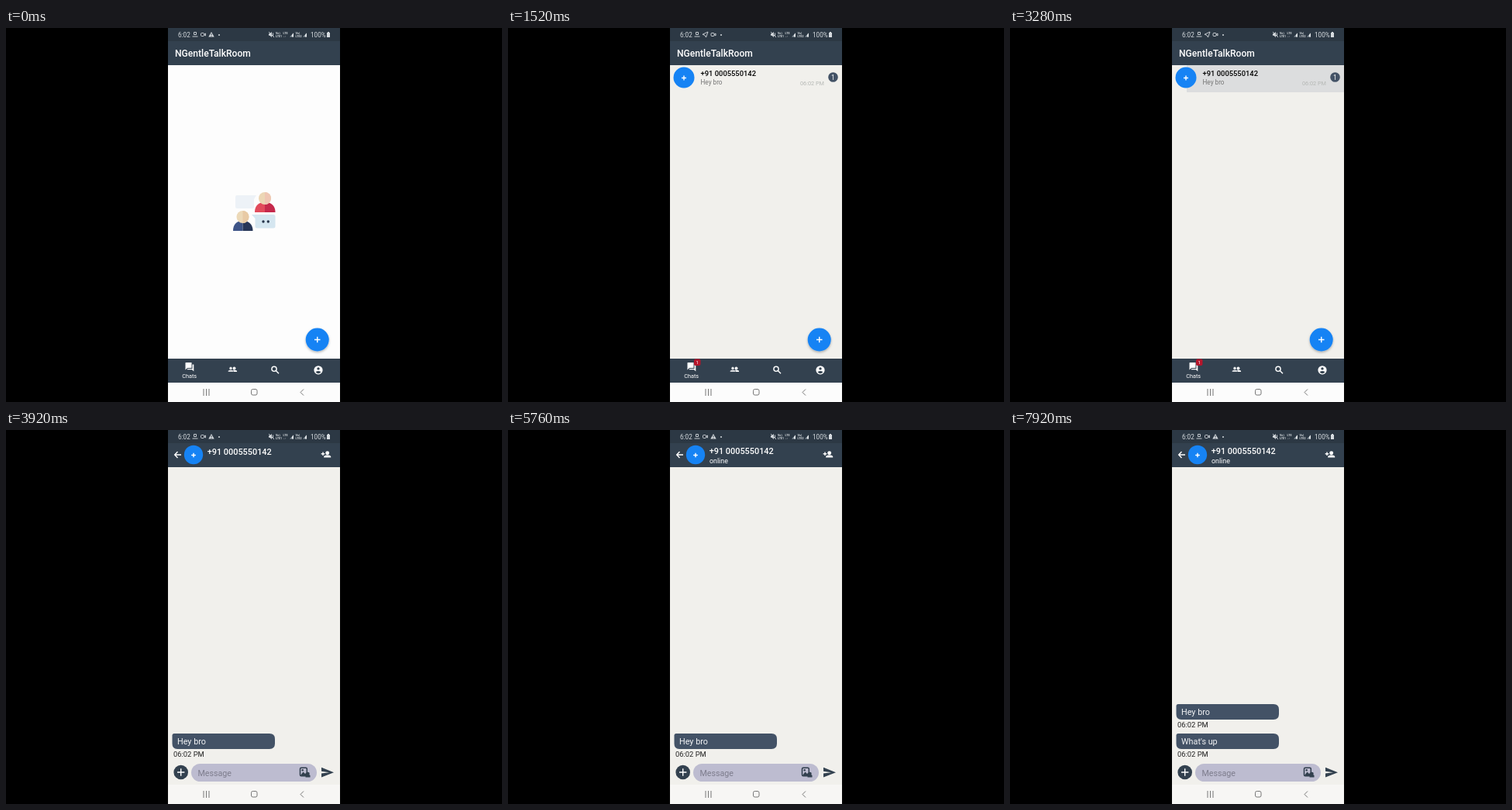
An HTML page for the animation above (8 s loop, 640 by 483 pixels).

```html
<!DOCTYPE html>
<html lang="en">
<head>
<meta charset="utf-8">
<title>Chat app</title>
<style>
  html, body { margin: 0; width: 100%; height: 100%; overflow: hidden; background: #000; }
  svg { display: block; width: 640px; height: 483px; font-family: Roboto, sans-serif; }
  .bar { fill: #33414f; }
  .white { fill: #fff; }
  .blue { fill: #1683f4; }
  .bubble { fill: #435266; }
  .line { fill: none; stroke: #fff; stroke-width: 1.4; }
  .thin { fill: none; stroke: #d5dade; stroke-width: .9; }
  .sys { fill: none; stroke: #777; stroke-width: 1; }
  .medium { font-weight: 500; }

  /* Scenes switch hard on one shared 8 s clock */
  .empty, .inbox, .filled, .chat, .plain, .online, .typing, .one, .two, .alert, .warn {
    animation: 8s step-end infinite;
  }
  .empty  { animation-name: empty; }
  .inbox  { animation-name: inbox; }
  .filled, .alert { animation-name: filled; }
  .warn   { animation-name: warn; }
  .chat   { animation-name: chat; }
  .plain  { animation-name: plain; }
  .online { animation-name: online; }
  .typing { animation-name: typing; }
  .one    { animation-name: one; }
  .two    { animation-name: two; }
  @keyframes empty  { 0% { visibility: visible } 10%, 100% { visibility: hidden } }
  @keyframes inbox  { 0% { visibility: visible } 45%, 100% { visibility: hidden } }
  @keyframes filled { 0% { visibility: hidden } 10% { visibility: visible } 45%, 100% { visibility: hidden } }
  @keyframes warn   { 0% { visibility: visible } 10% { visibility: hidden } 45%, 100% { visibility: visible } }
  @keyframes chat   { 0% { visibility: hidden } 45%, 100% { visibility: visible } }
  @keyframes plain  { 0% { visibility: hidden } 45% { visibility: visible } 56%, 100% { visibility: hidden } }
  @keyframes online { 0% { visibility: hidden } 56% { visibility: visible } 80% { visibility: hidden } 93%, 100% { visibility: visible } }
  @keyframes typing { 0% { visibility: hidden } 80% { visibility: visible } 93%, 100% { visibility: hidden } }
  @keyframes one    { 0%, 100% { transform: none } 93% { transform: translateY(-38px) } }
  @keyframes two    { 0% { visibility: hidden } 93%, 100% { visibility: visible } }

  .press { animation: press 8s linear infinite; }
  @keyframes press { 0%, 39% { opacity: 0 } 41%, 45% { opacity: 1 } 45.01%, 100% { opacity: 0 } }
  .say { animation: say 8s linear infinite; }
  @keyframes say { 0% { fill: #edf2f7 } 6%, 100% { fill: #dce9f2 } }
  .dot { fill: #26344a; animation: dot .8s linear infinite; }
  .dot.first { animation-name: first; }
  @keyframes dot { 0%, 60% { opacity: 1 } 85% { opacity: 0 } }
  @keyframes first { 0%, 20% { opacity: 0 } 40%, 85% { opacity: 1 } }
</style>
</head>
<body>
<svg viewBox="0 0 640 483">
  <defs>
    <filter id="shadow" x="-30%" y="-30%" width="160%" height="160%">
      <feDropShadow dx="0" dy="1.5" stdDeviation="1.5" flood-opacity=".3"/>
    </filter>
    <g id="signal"><path d="M0 6 5 1V6Z" fill="#8d98a2"/><path d="M3 6V3L5 1V6Z" fill="#dfe3e6"/></g>
    <g id="person">
      <circle r="3"/><path d="M-5.5 7V6C-5.5 3.6-2 3.3 0 3.3S5.5 3.6 5.5 6V7Z"/>
    </g>
    <path id="message" d="M217 392H340Q347 392 347 399V405Q347 412 340 412H221Q214.500 412 214.500 405V394.500Q214.500 392 217 392Z"/>
  </defs>

  <rect width="640" height="483"/>
  <rect x="209" width="222" height="483" fill="#f1f0ec"/>
  <rect class="bar" x="209" y="16" width="222" height="32"/>
  <rect x="209" width="222" height="17" fill="#2c3844"/>

  <!-- status bar -->
  <g font-size="8.2" fill="#d5dade">
    <text x="222" y="12">6:02</text>
    <path class="thin" d="M242.500 5.500h3v3h-3zM240.500 11h7"/>
    <g class="warn">
      <rect class="thin" x="251.500" y="6.500" width="4" height="4" rx="1"/><path class="thin" d="M255.500 8.500 257.500 7V10Z"/>
      <path d="M265 5 268.700 11.500H261.300Z"/><path d="M265 7.200V9.300M265 10V10.800" stroke="#2c3844"/>
    </g>
    <g class="alert">
      <path class="thin" d="M251 8.300 258 5 255.500 12 254 9.300Z"/>
      <rect class="thin" x="262" y="6.500" width="4" height="4" rx="1"/><path class="thin" d="M266 8.500 268 7V10Z"/>
    </g>
    <circle cx="275" cy="9" r="1"/>
    <path d="M339 7.200H340.500L343 5V12L340.500 9.800H339Z"/><path class="thin" d="M339 5 346 12M344.500 6.500V10.500"/>
    <g font-size="3.7" font-weight="700">
      <text x="348" y="8">Vo)</text><text x="348" y="11.700">LTE1</text>
      <text x="357.500" y="8">LTE</text><text x="358" y="11.700">&#8595;&#8593;</text>
      <text x="373.500" y="8">Vo)</text><text x="373.500" y="11.700">LTE2</text>
    </g>
    <use href="#signal" x="366" y="5.500"/><use href="#signal" x="383" y="5.500"/>
    <text x="393" y="12">100%</text>
    <path d="M415 5H417V6H418V12H414V6H415Z"/>
  </g>

  <!-- chat list -->
  <g class="inbox">
    <text class="white medium" x="218" y="37" font-size="12.1">NGentleTalkRoom</text>

    <g class="empty">
      <rect x="209" y="48" width="222" height="379" fill="#fdfdfd"/>
      <path class="say" d="M298 216H323L320 221V231Q320 233 318 233H298Q296 233 296 231V218Q296 216 298 216Z"/>
      <path d="M317 241H345Q347.500 241 347.500 243.500V256Q347.500 258.500 345 258.500H324Q321.500 258.500 321.500 256V246Z" fill="#d5e6f0"/>
      <circle class="dot first" cx="325.500" cy="250" r="1.700"/>
      <circle class="dot" cx="332" cy="250" r="1.700"/>
      <circle class="dot" cx="338.300" cy="250" r="1.700"/>
      <path d="M321 238C321 229 326 225 334 225V238Z" fill="#e14a5b"/>
      <path d="M334 225C342 225 347.500 229 347.500 238H334Z" fill="#c5294b"/>
      <circle cx="334" cy="220" r="8" fill="#ecd6b5"/><path d="M334 212A8 8 0 0 1 334 228Z" fill="#efc6b3"/>
      <path d="M293 262C293 253 298 249 305.500 249V262Z" fill="#3e5487"/>
      <path d="M305.500 249C313 249 318.500 253 318.500 262H305.500Z" fill="#273658"/>
      <circle cx="305.500" cy="244" r="8" fill="#ecd9b8"/><path d="M305.500 236A8 8 0 0 1 305.500 252Z" fill="#e8caa5"/>
    </g>

    <g class="filled">
      <rect class="press" x="228" y="48" width="203" height="35" fill="#dcddde"/>
      <circle class="blue" cx="227" cy="64" r="13.500"/>
      <path class="line" d="M224 64.500h6M227 61.500v6"/>
      <text class="medium" x="248.500" y="61.500" font-size="9.400">+91 0005550142</text>
      <text x="248.500" y="73.300" font-size="8.200" fill="#777">Hey bro</text>
      <text x="377" y="73.500" font-size="7.300" fill="#b5b8b5">06:02 PM</text>
      <circle class="bubble" cx="419.500" cy="63.500" r="6.300"/>
      <text class="white" x="419.500" y="66.500" font-size="8.500" text-anchor="middle">1</text>
    </g>

    <circle class="blue" cx="401.700" cy="402.500" r="15" filter="url(#shadow)"/>
    <path class="line" d="M398 402.500h7.500M401.750 398.750v7.500" stroke-width="1.200"/>

    <rect class="bar" x="209" y="427" width="222" height="31"/>
    <g class="white">
      <path d="M232 432H239.500V439H234L231.500 441.500V432.500Z"/>
      <path d="M240.500 434.500H242.300V443.500L240 441.300H234V440H240.500Z"/>
      <text x="236.700" y="452" font-size="7.300" text-anchor="middle">Chats</text>
      <g transform="translate(294.500 439.500) scale(.65)"><use href="#person"/></g>
      <g transform="translate(290 439.500) scale(.65)"><use href="#person" stroke="#33414f" stroke-width=".8"/></g>
      <circle class="line" cx="346" cy="440.300" r="3.100"/><path class="line" d="M348.300 442.600 352 446.300"/>
      <circle cx="403" cy="441.800" r="5.600"/>
      <g class="bar"><circle cx="403" cy="439.900" r="1.700"/><path d="M399.500 444.300Q403 441.500 406.500 444.300 403 448 399.500 444.300Z"/></g>
    </g>
    <g class="filled">
      <rect x="240" y="427.500" width="8.500" height="8.500" rx="2" fill="#b5152b"/>
      <text class="white" x="244.200" y="434" font-size="6" text-anchor="middle">1</text>
    </g>
  </g>

  <!-- conversation -->
  <g class="chat">
    <path class="line" d="M226 32H218M221.500 28 217.700 32 221.500 36"/>
    <circle class="blue" cx="242" cy="32" r="12.200"/>
    <path class="line" d="M239.200 32.500h5.600M242 29.700v5.600"/>
    <g class="white">
      <text class="plain medium" x="259.700" y="31.700" font-size="10.900">+91 0005550142</text>
      <g class="online">
        <text class="medium" x="259.700" y="30.700" font-size="10.900">+91 0005550142</text>
        <text x="260" y="43" font-size="8.900">online</text>
      </g>
      <g class="typing">
        <text class="medium" x="259.700" y="30.700" font-size="10.900">+91 0005550142</text>
        <text x="260" y="43" font-size="8.900">typing...</text>
      </g>
      <g transform="translate(414.700 29.700) scale(.82)"><use href="#person"/></g>
      <path class="line" d="M406.700 30.800h4.600M409 28.500v4.600"/>
    </g>

    <g class="one">
      <use class="bubble" href="#message"/>
      <text x="221" y="406" font-size="10.800" fill="#f2f3f5">Hey bro</text>
      <text x="216" y="422" font-size="9.400" fill="#222">06:02 PM</text>
    </g>
    <g class="two">
      <use class="bubble" href="#message"/>
      <text x="221" y="406" font-size="10.800" fill="#f2f3f5">What's up</text>
      <text x="216" y="422" font-size="9.400" fill="#222">06:02 PM</text>
    </g>

    <circle class="bar" cx="225.700" cy="442" r="9.300"/>
    <path class="line" d="M221 442h9.400M225.700 437.300v9.400" stroke-width="2"/>
    <rect x="239" y="431" width="162" height="23" rx="11.500" fill="#bdbcd0"/>
    <text x="247.500" y="446.500" font-size="10.700" fill="#7d7c8c">Message</text>
    <rect x="379.500" y="436.200" width="8.800" height="10.500" rx="1.500" fill="none" stroke="#2f3c4b" stroke-width="1.500"/>
    <path class="bar" d="M380 446 383.500 441.500 386 444 388 442V447H380Z"/>
    <circle class="bar" cx="382.700" cy="439.300" r="1.200"/>
    <circle class="bar" cx="389.700" cy="443.700" r="2"/>
    <path class="bar" d="M386.500 448.500V446.500Q386.500 445 388 445H391Q392.500 445 392.500 446.500V448.500Z"/>
    <path class="bar" d="M407 435.800 423 442.200 407 448.500V443.600L417 442.200 407 440.800Z"/>
  </g>

  <!-- system navigation -->
  <rect x="209" y="458" width="222" height="25" fill="#f7f6f4"/>
  <rect class="inbox" x="209" y="458" width="222" height="25" fill="#fcfcfc"/>
  <path class="sys" d="M255 466v9M258.500 466v9M262 466v9"/>
  <rect class="sys" x="316.500" y="466.500" width="7.500" height="7.500" rx="2"/>
  <path class="sys" d="M384 466.500 380 470.500 384 474.500"/>
</svg>
</body>
</html>
```
